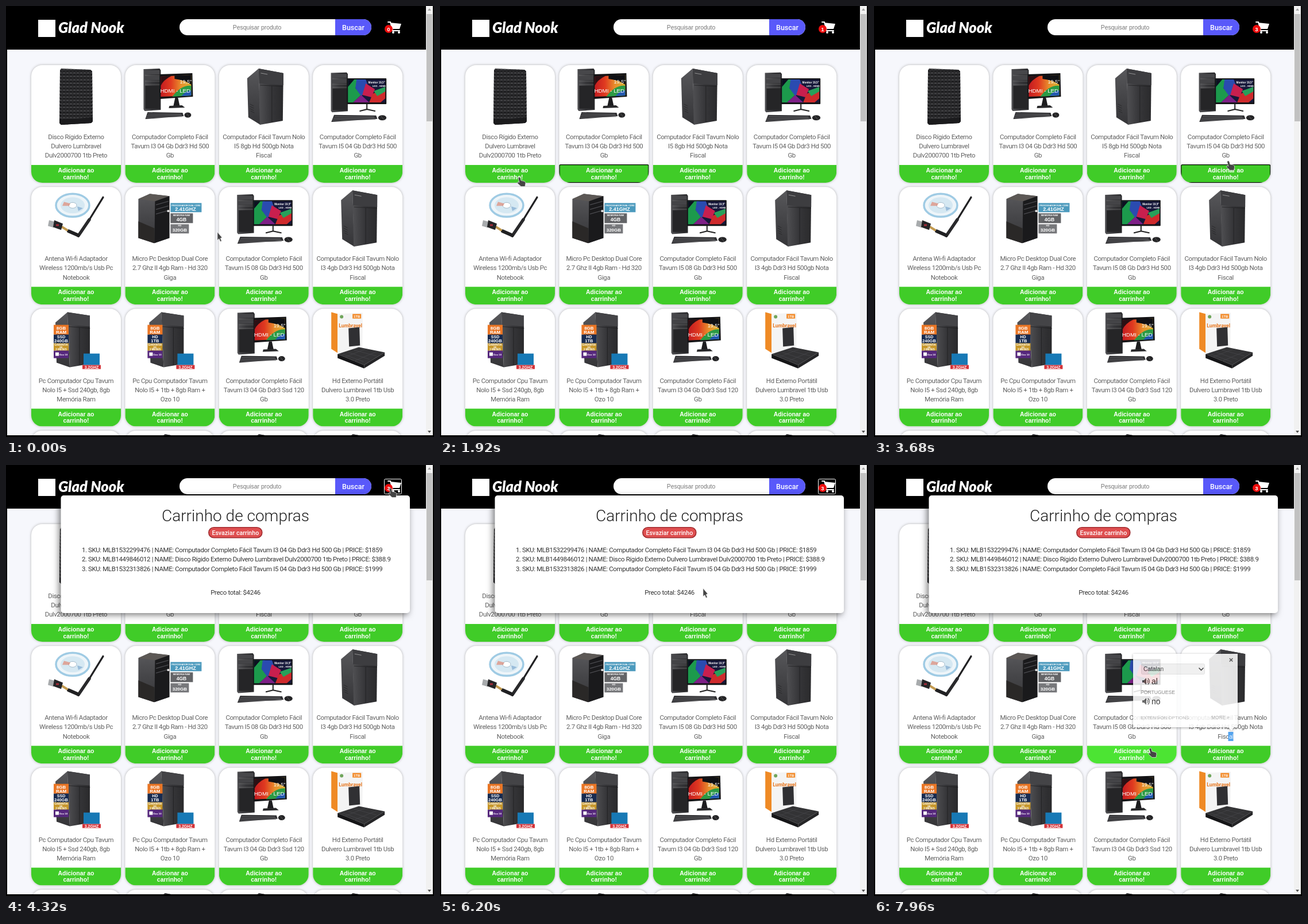
Write an HTML page that moves like this. It is 745x751 px and loops after 8 s.

```html
<!DOCTYPE html>
<html lang="pt">
<head>
<meta charset="utf-8">
<style>
html, body { margin: 0; width: 100%; height: 100%; overflow: hidden; background: #f6f7fc; }
svg { display: block; width: 745px; height: 751px; font-family: Roboto, sans-serif; }
.mid { text-anchor: middle; }
.arial { font-family: "Liberation Sans", sans-serif; }
.bold { font-weight: 700; }
.desc { font-size: 11.4px; letter-spacing: -.37px; fill: #606060; }
.item { font-size: 11.4px; letter-spacing: -.33px; fill: #333; }
.card { filter: drop-shadow(0 0 2px #aaae); }
.cart { filter: drop-shadow(-3px 3px 6px #0008); }
.tip { filter: drop-shadow(0 1px 2px #0006); }
</style>
</head>
<body>
<svg id="stage" viewBox="0 0 745 751"></svg>
<script>
const rect = (x, y, w, h, fill, r = 0, more = '') =>
  `<rect x="${x}" y="${y}" width="${w}" height="${h}" fill="${fill}" rx="${r}" ${more}/>`;
const poly = (points, fill) => `<polygon points="${points}" fill="${fill}"/>`;
const path = (d, fill, more = '') => `<path d="${d}" fill="${fill}" ${more}/>`;
const line = (d, color, w) => path(d, 'none', `stroke="${color}" stroke-width="${w}" stroke-linecap="round"`);
const text = (x, y, s, size, fill, cls = '', more = '') =>
  `<text x="${x}" y="${y}" font-size="${size}" fill="${fill}" class="${cls}" ${more}>${s}</text>`;
const label = (x, y, s, size, fill = '#fff') => text(x, y, s, size, fill, 'mid arial bold');
const circle = (x, y, r, fill) => `<circle cx="${x}" cy="${y}" r="${r}" fill="${fill}"/>`;
const oval = (x, y, rx, ry, fill, more = '') => `<ellipse cx="${x}" cy="${y}" rx="${rx}" ry="${ry}" fill="${fill}" ${more}/>`;
const gradient = (id, colors, more = '') => `<linearGradient id="${id}" ${more}>` +
  colors.map((c, i) => `<stop offset="${i / (colors.length - 1)}" stop-color="${c}"/>`).join('') + '</linearGradient>';

// Product pictures, in card coordinates
const drive = () => {
  const shape = '52,6 103,8 106,11 107,98 104,101 52,104 49,101 50,9';
  return poly(shape, '#29292b') + poly(shape, 'url(#studs)') + poly('49,95 107,91 107,98 104,101 52,104 49,101', '#1b1b1d');
};

const tower = () =>
  poly('49,23 69,6 72,104 51,91', 'url(#side)') +
  poly('69,6 112,14 111,97 71,104', 'url(#front)') +
  poly('69,6 112,14 112,35 70,32', '#3d3d40') +
  line('M72 35L111 37M92 37V99', '#1c1c1e', .7) + line('M73 14L84 16', '#aaa', .8) +
  line('M54 68L60 71M54 72L60 75M54 76L60 79M55 80L61 83', '#2a2a2c', 1);

const miniTower = () =>
  poly('32,7 60,6 62,9 62,78 34,80 32,77', 'url(#front)') +
  rect(34, 9, 26, 7, '#47474a') + rect(34, 19, 26, 7, '#444447') +
  line('M35 18H60M35 28H60M35 34H60', '#777', .6) + rect(35, 36, 25, 40, '#252527');

const keyboard = () =>
  poly('39,82 100,83 102,89 35,94', '#303033') +
  line('M40 85L97 85.5M38 88L98 87.5M37 91L99 90', '#77777a', .7) +
  oval(109, 87, 6, 4.5, '#242426') + line('M107 84L111 90', '#666', .7);

const smallPc = () =>
  miniTower() + poly('60,16 117,14 118,55 60,59', '#141416') + poly('62,20 115,17 115,53 62,55', 'url(#warm)') +
  path('M62 20L82 18Q66 26 62 36Z', '#2b1014') + path('M82 55Q98 34 115 36V53Z', '#2b9a45') +
  path('M98 54Q106 44 115 44V53Z', '#2358b0') + path('M86 18L115 17V34Q104 26 86 24Z', '#101014') +
  poly('87,57 92,57 95,71 84,71', '#1d1d1f') + poly('77,71 99,70 104,74 76,75', '#28282a') +
  keyboard() + text(61, 48, 'HDMI - LED', 9.8, '#fff', 'arial') + text(95, 32, '19,5"', 9, '#fff', 'arial');

const widePc = () =>
  `<g transform="translate(0 7) scale(.98 .94)">${miniTower()}</g>` +
  rect(59, 23, 69, 45, '#151517', 1) + rect(61, 25, 65, 40, '#16183a') +
  path('M61 25H80L74 40L84 52L70 65H61Z', '#1c9a4c') + path('M76 25H92L98 42L84 54L74 40Z', '#2a4bb0') +
  path('M92 32L108 42L102 56L86 52Z', '#c81f4e') + path('M70 65L84 52L98 65Z', '#7d1f86') +
  path('M98 65L104 50L126 40V58L118 65Z', '#cf2a2c') + path('M106 45L126 38V46L112 54Z', '#27a05a') +
  path('M61 25L72 25L61 38Z', '#0d1020') +
  line('M94 68V77M94 77L82 80M94 77L108 80', '#222', 2) +
  `<g transform="translate(-10 3) scale(1.2 1.02)">${keyboard()}</g>` +
  label(111, 32, 'Monitor 19,5"', 4.6) + label(115, 38, 'LED - HDMI', 4.2);

const antenna = () =>
  oval(72, 32, 29, 20, '#eef5f9', 'stroke="#9fcbe4" stroke-width="3.5"') +
  oval(72, 32, 21, 14, '#d5e8f2') + oval(72, 32, 7, 5, '#fff', 'stroke="#a5bccb"') +
  path('M57 26L68 29L66 33L54 33Z', '#e27a60', 'opacity=".6"') + path('M80 34L90 37L82 42Z', '#7fa9d0', 'opacity=".7"') +
  line('M125 18L101 57', '#222224', 3.2) + line('M101 57L82 85', '#29292b', 5.5) +
  line('M81 84L65 77', '#202022', 6) + line('M62 75L54 70', '#c39a4f', 4) +
  poly('31,58 42,61 39,71 29,68', '#a8abad') + poly('40,58 55,64 52,75 38,70', '#252527') + rect(43, 65, 5, 3, '#a32b38');

const blackPc = () =>
  poly('23,21 43,12 77,16 77,89 50,98 23,89', 'url(#side)') + poly('23,21 43,12 77,16 52,25', '#5c5855') +
  poly('52,25 77,16 77,89 51,98', '#1a1a1c') + poly('23,60 51,72 51,98 23,89', '#2a2827') +
  line('M54 31L75 25M54 39L75 33M54 47L75 41', '#4c4c50', 1.2) + circle(75, 42, 2, '#e8e8e8') +
  rect(79, 28, 54, 16, '#4c9abd') + label(106, 34, 'PROCESSADOR DUAL CORE', 3.6) + label(105, 42, '2.41GHZ', 9) +
  rect(79, 46, 39, 17, '#636467') + label(98, 51, 'MEMORIA RAM', 4) + label(98, 60, '4GB', 8.5) +
  rect(79, 65, 32, 16, '#77787b') + label(95, 69, 'HD', 4) + label(95, 78, '320GB', 8);

const badgedPc = (kind, size) =>
  poly('42,24 63,6 67,102 44,94', 'url(#side)') + poly('63,6 102,12 102,96 67,102', 'url(#front)') +
  poly('63,6 102,12 102,31 64,28', '#444447') + line('M65 31L102 34M84 33V98', '#1a1a1c', .7) +
  rect(39, 28, 26, 17, '#ea7625') + label(52, 36, '8GB', 8) + label(52, 43.5, 'RAM', 8) +
  rect(39, 45, 26, 15, '#182b50') + label(52, 51.5, kind, 7) + label(52, 58.5, size, 7.5) +
  rect(39, 60, 26, 13, '#c69629') + label(52, 64, 'GARANTIA', 4.5) + label(52, 68, 'DE', 4) + label(52, 72, '3 MESES', 4.5) +
  rect(39, 73, 26, 13, '#56287d') + rect(42, 76, 6, 6, '#fff') + label(56, 81, 'Ozo 10', 4.4) +
  rect(91, 78, 28, 20, '#1779b5') + rect(89, 98, 32, 7, '#d53238') + label(105, 104, '3.2GHZ', 7);

const boxedDrive = () =>
  poly('32,6 43,9 43,77 32,70', '#ef8a25') + poly('43,9 87,7 86,72 43,77', '#f4f4f4') +
  rect(69, 9, 15, 8, '#f28b2a') + label(76.5, 15.5, '1TB', 6) + circle(50, 14, 3, '#70a55b') +
  text(45, 32, 'Lumbravel', 8.7, '#e87820', 'bold') +
  poly('62,34 81,32 82,64 63,66', '#303033') +
  poly('43,79 80,67 125,76 89,98', '#333335') + line('M52 79L88 92M62 76L98 88M72 72L110 82M56 84L92 70M72 91L110 75', '#454548', .8) +
  poly('43,79 89,98 89,104 43,86', '#161618') + poly('89,98 125,76 125,82 89,104', '#252527');

const complete = s => ['Computador Completo Fácil', `Tavum ${s}`, 'Gb'];
const easy = s => ['Computador Fácil Tavum Nolo', s, 'Fiscal'];
const products = [
  [drive(), ['Disco Rígido Externo', 'Dulvero Lumbravel', 'Dulv2000700 1tb Preto']],
  [smallPc(), complete('I3 04 Gb Ddr3 Hd 500')],
  [tower(), easy('I5 8gb Hd 500gb Nota')],
  [widePc(), complete('I5 04 Gb Ddr3 Hd 500')],
  [antenna(), ['Antena Wi-fi Adaptador', 'Wireless 1200mb/s Usb Pc', 'Notebook']],
  [blackPc(), ['Micro Pc Desktop Dual Core', '2.7 Ghz II 4gb Ram - Hd 320', 'Giga']],
  [widePc(), complete('I5 08 Gb Ddr3 Hd 500')],
  [tower(), easy('I3 4gb Ddr3 Hd 500gb Nota')],
  [badgedPc('SSD', '240GB'), ['Pc Computador Cpu Tavum', 'Nolo I5 + Ssd 240gb, 8gb', 'Memória Ram']],
  [badgedPc('HD', '1TB'), ['Pc Cpu Computador Tavum', 'Nolo I5 + 1tb + 8gb Ram +', 'Ozo 10']],
  [smallPc(), complete('I3 04 Gb Ddr3 Ssd 120')],
  [boxedDrive(), ['Hd Externo Portátil', 'Dulvero Lumbravel 1tb Usb', '3.0 Preto']],
  ['', []], [tower(), []], [tower(), []], [tower(), []]
];

const card = ([picture, lines], i) => `<g transform="translate(${44 + i % 4 * 163.4} ${103 + (i >> 2) * 212.3})">
  ${rect(0, 0, 156, 205, '#fff', 19, 'class="card"')}${picture}
  ${lines.map((s, k) => `<text x="78" y="${129 + k * 16.2}" class="desc mid">${s}</text>`).join('')}
  <g clip-path="url(#cardClip)">${rect(0, 174, 156, 31, '#40cc28', 0, `id="btn${i}"`)}
  ${label(78, 187, 'Adicionar ao', 10.4)}${label(78, 198.5, 'carrinho!', 10.4)}
  ${rect(.6, 173.6, 155, 31, 'none', 2, `id="focus${i}" stroke="#000" stroke-width="1.3"`)}</g></g>`;

const items = [
  `MLB1532299476 | NAME: ${complete('I3 04 Gb Ddr3 Hd 500').join(' ')} | PRICE: $1859`,
  'MLB1449846012 | NAME: Disco Rígido Externo Dulvero Lumbravel Dulv2000700 1tb Preto | PRICE: $388.9',
  `MLB1532313826 | NAME: ${complete('I5 04 Gb Ddr3 Hd 500').join(' ')} | PRICE: $1999`
];

const speaker = y => path(`M467 ${y - 2}h3l4-4v12l-4-4h-3z`, '#555') +
  line(`M476 ${y - 2}q2 2 0 4M477 ${y - 5}q5 5 0 10`, '#555', 1.2);

document.getElementById('stage').innerHTML = `<defs>
  <clipPath id="cardClip">${rect(0, 0, 156, 205, '#fff', 19)}</clipPath>
  <pattern id="studs" width="6" height="6" patternUnits="userSpaceOnUse">
    <path d="M0 3L3 0L6 3Z" fill="#434346"/><path d="M0 3L3 6L6 3Z" fill="#1a1a1c"/></pattern>
  ${gradient('front', ['#505053', '#363639', '#2a2a2c'])}
  ${gradient('side', ['#58585b', '#454548', '#353538'], 'x2="0" y2="1"')}
  ${gradient('warm', ['#c41c20', '#e03a20', '#e8902c', '#d8b030'])}
</defs>
${rect(0, 0, 745, 751, '#f6f7fc')}
${products.map(card).join('')}
<g id="selection">${rect(616.5, 465, 9, 16, '#55a4ee')}
  <text x="612.2" y="${129 + 32.4 + 315.3}" class="desc mid" style="fill:none">Fisc<tspan fill="#e8f3ff">al</tspan></text></g>
${rect(0, 0, 731, 76, '#000')}
${rect(56, 24, 30, 30, '#fff')}
${text(91, 47, 'Glad Nook', 25.5, '#fff', '', 'font-weight="900" font-style="italic" style="font-family:Lato,sans-serif"')}
${rect(302, 23, 334, 28, '#fff', 14)}
${path('M573 23H622a14 14 0 0 1 0 28H573Z', '#5959fa')}
${text(437, 41, 'Pesquisar produto', 10.4, '#757575', 'mid arial')}
${text(604.5, 42, 'Buscar', 12.5, '#fff', 'mid', 'font-weight="500"')}
${rect(658.5, 24.5, 30, 26, 'none', 2, 'id="cartFocus" stroke="#fff"')}
${path('M669 29L688 31L685 40H672Z', '#fff')}${line('M665 28H669L673 43H685', '#fff', 2)}
${circle(674, 46, 2, '#fff')}${circle(684, 46, 2, '#fff')}
${circle(666, 40, 7, '#ee0c0c')}${label(666, 43.5, '<tspan id="count">0</tspan>', 9.5)}
<g id="cart">${rect(95.5, 53, 607.5, 205, '#fff', 5, 'class="cart"')}
  ${text(399.5, 97.5, 'Carrinho de compras', 28, '#222', 'mid', 'font-weight="300"')}
  ${rect(352.8, 108.8, 93, 18, '#df4f50', 9, 'stroke="#a12c30" stroke-width="1.6"')}
  ${text(399.3, 121.7, 'Esvaziar carrinho', 10.6, '#fff', 'mid', 'font-weight="500"')}
  ${items.map((s, i) => `<text x="132" y="${152 + i * 16.4}" class="item">${i + 1}.</text>
    <text x="143" y="${152 + i * 16.4}" class="item">SKU: ${s}</text>`).join('')}
  <text x="399.5" y="226" class="item mid">Preco total: $4246</text></g>
<g id="translate" class="arial"><g class="tip">${rect(451, 329, 182, 128, '#fff')}${poly('616,456 628,456 622,463', '#fff')}</g>
  ${text(621.5, 344, '×', 13, '#555', 'mid bold')}
  ${rect(465.5, 346.5, 110, 18, '#eee', 2, 'stroke="#ddd"')}${text(469, 359, 'Catalan', 10.2, '#333')}
  ${line('M566 354l3.5 3.5l3.5-3.5', '#333', 1.7)}
  ${speaker(377)}${text(483, 382, 'al', 14, '#222')}
  ${text(464, 399, 'PORTUGUESE', 8.6, '#777')}
  ${speaker(412)}${text(483, 417, 'no', 14, '#222')}
  ${text(464, 442.5, 'EXTENSION OPTIONS', 8, '#aaa')}${text(587, 442.5, 'MORE »', 8.3, '#aaa')}</g>
${rect(731, 0, 12, 748, '#f1f1f1')}${rect(732, 14, 10, 187, '#c1c1c1')}
${poly('734,8 740,8 737,4', '#a3a3a3')}${poly('734,740 740,740 737,744', '#505050')}
${rect(0, 0, 2, 751, '#000')}${rect(743, 0, 2, 751, '#000')}${rect(0, 748, 745, 3, '#000')}
<g id="pointer" stroke-linejoin="round">
  ${path('M0 0V14L3 11.5L5 16.5L7.3 15.5L5.2 10.7L8 9.5Z', '#444', 'id="arrow" stroke="#eee" stroke-width=".6"')}
  ${path('M-3 2Q-3 0-1 0Q0 0 1 2L2 6L8 7.5Q10 8.5 10 10.5L9 16.5H2L-4 11Q-5 8.5-3 8.5L-1 9.5Z', '#444', 'id="hand" stroke="#eee" stroke-width=".7"')}
  <g id="beam">${line('M-3-8Q0-8 0-6Q0-8 3-8M0-6V6M-3 8Q0 8 0 6Q0 8 3 8', '#333', 1.1)}</g></g>`;

// Pointer stops: time, x, y, shape until the next stop
const A = 'arrow', H = 'hand', B = 'beam';
const stops = [
  [0, 368, 394, A], [360, 368, 394, A], [860, 288, 308, H], [1000, 268, 286, H], [1919, 268, 286, H],
  [1920, 139, 298, H], [2040, 139, 298, H], [2160, 172, 311, A], [2400, 320, 316, A], [2720, 536, 304, A],
  [2800, 536, 304, A], [2840, 548, 301, H], [3080, 608, 290, H], [3600, 608, 290, H], [3700, 620, 265, A],
  [4000, 667, 66, A], [4060, 670, 40, H], [4400, 670, 40, H], [4480, 660, 56, A], [4960, 470, 138, A],
  [5040, 446, 145, B], [5240, 409, 148, B], [5320, 409, 150, B], [5440, 409, 170, B], [5640, 409, 170, B],
  [5680, 426, 170, B], [5840, 426, 170, B], [5900, 434, 190, A], [6200, 458, 215, A], [6400, 452, 218, A],
  [6470, 443, 220, B], [6560, 431, 222, B], [6680, 431, 222, B], [6740, 448, 240, A], [7060, 602, 446, A],
  [7150, 626, 473, B], [7250, 617, 473, B], [7320, 612, 489, H], [7400, 607, 499, H], [7560, 607, 499, H],
  [7960, 482, 493, H], [8000, 482, 493, H]
];
// Button number, start, end
const hovers = [[0, 1960, 2120], [3, 2880, 3640], [7, 7520, 7800], [6, 7840, 8000]];
const focuses = [[1, 1920, 2040], [0, 2040, 3200], [3, 3200, 4080]];

const el = id => document.getElementById(id);
const show = (id, on) => el(id).style.display = on ? '' : 'none';
const active = (list, i, t) => list.some(([n, from, to]) => n === i && t >= from && t < to);

function draw(t) {
  const i = stops.findIndex((s, k) => k === stops.length - 2 || t < stops[k + 1][0]);
  const [t0, x0, y0, shape] = stops[i], [t1, x1, y1] = stops[i + 1];
  const p = (t - t0) / (t1 - t0);
  el('pointer').setAttribute('transform', `translate(${x0 + (x1 - x0) * p} ${y0 + (y1 - y0) * p})`);
  for (const s of [A, H, B]) show(s, s === shape);

  products.forEach((_, n) => {
    el('btn' + n).setAttribute('fill', active(hovers, n, t) ? '#4ce433' : '#40cc28');
    show('focus' + n, active(focuses, n, t));
  });
  el('count').textContent = [1920, 2040, 3200].filter(c => t >= c).length;
  show('cart', t >= 4080);
  show('cartFocus', t >= 4080 && t < 6560);
  show('selection', t >= 7200);
  el('translate').setAttribute('opacity', Math.max(0, Math.min(1, (t - 7780) / 210)));
}

function loop() {
  draw(performance.now() % 8000);
  requestAnimationFrame(loop);
}
loop();
</script>
</body>
</html>
```
